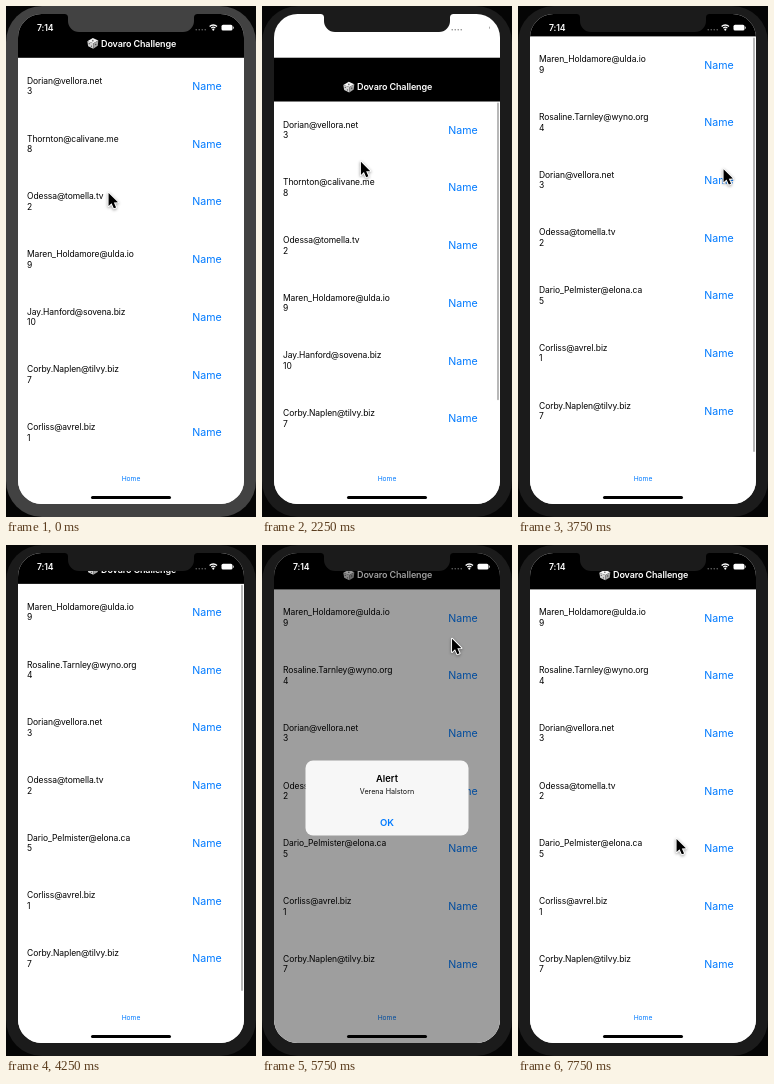
Write an HTML page with a canvas that moves like this. It is 250 px wide and 511 px high and loops after 8000 ms.

```html
<!DOCTYPE html>
<html lang="en">
<head>
<meta charset="utf-8">
<title>User list</title>
<style>
  html, body { margin: 0; width: 100%; height: 100%; overflow: hidden; background: #000; }
  canvas { display: block; width: 250px; height: 511px; }
</style>
</head>
<body>
<canvas id="stage"></canvas>
<script>
const W = 250, H = 511, LOOP = 8000, STEP = 250;
const BLUE = '#007aff', FONT = 'Inter, Roboto, sans-serif';
const SCREEN = { x: 12, y: 8, w: 226, h: 490, r: 23.5 };
const HEADER = 51.8, ROW_H = 57.7, LIST_END = 447, MAX_SCROLL = 7.4;

const canvas = document.getElementById('stage');
const ctx = canvas.getContext('2d');
const ratio = window.devicePixelRatio || 1;
canvas.width = W * ratio;
canvas.height = H * ratio;

const users = {
  1: 'Corliss@avrel.biz',
  2: 'Odessa@tomella.tv',
  3: 'Dorian@vellora.net',
  4: 'Rosaline.Tarnley@wyno.org',
  5: 'Dario_Pelmister@elona.ca',
  7: 'Corby.Naplen@tilvy.biz',
  8: 'Thornton@calivane.me',
  9: 'Maren_Holdamore@ulda.io',
  10: 'Jay.Hanford@sovena.biz'
};

// Visible ids before, between and after the two refreshes
const firstList = [3, 8, 2, 9, 10, 7, 1];
const secondList = [3, 9, 2, 4, 7, 10, 8];
const thirdList = [9, 4, 3, 2, 5, 1, 7];

// Pointer gestures, each continuing from the last position
const pointerStart = { x: 102, y: 186 };
const gestures = [
  { from: 350, to: 1500, x: 115, y: 68 },
  { from: 1500, to: 1750, x: 116, y: 77 },
  { from: 1750, to: 2950, x: 55, y: 346 },
  { from: 3000, to: 4000, x: 215, y: 150 },
  { from: 4250, to: 5250, x: 196, y: 74 },
  { from: 5450, to: 6500, x: 126, y: 276 },
  { from: 7250, to: 7750, x: 158, y: 293 }
];

const ramp = (t, from, to) => Math.min(1, Math.max(0, (t - from) / (to - from)));
const bump = (t, from, to) => Math.sin(Math.PI * ramp(t, from, to)) ** 2;
const ease = p => p < 0.5 ? 4 * p ** 3 : 1 - 4 * (1 - p) ** 3;

function pointerAt(t) {
  let { x, y } = pointerStart;
  for (const g of gestures) {
    const p = ease(ramp(t, g.from, g.to));
    x += (g.x - x) * p;
    y += (g.y - y) * p;
  }
  return [x, y];
}

// Pull to refresh, then a push past the end that springs back
function scrollAt(t) {
  return MAX_SCROLL * ease(ramp(t, 3000, 4000))
    - 50 * bump(t, 1750, 3050)
    + 16 * bump(t, 3250, 4500);
}

function listAt(t) {
  if (t < 2500) return firstList;
  return t < 3750 ? secondList : thirdList;
}

function text(str, x, y, size, color, weight = 400, align = 'left', spacing = 0) {
  ctx.font = `${weight} ${size}px ${FONT}`;
  ctx.letterSpacing = spacing + 'px';
  ctx.textAlign = align;
  ctx.fillStyle = color;
  ctx.fillText(str, x, y);
}

function rect(x, y, w, h, color) {
  ctx.fillStyle = color;
  ctx.fillRect(x, y, w, h);
}

function round(x, y, w, h, r, color) {
  ctx.beginPath();
  ctx.roundRect(x, y, w, h, r);
  ctx.fillStyle = color;
  ctx.fill();
}

function dot(x, y, r, color) {
  ctx.beginPath();
  ctx.arc(x, y, r, 0, Math.PI * 2);
  ctx.fillStyle = color;
  ctx.fill();
}

function fillPath(d, color) {
  ctx.fillStyle = color;
  ctx.fill(new Path2D(d));
}

function drawDie(x, y) {
  ctx.save();
  ctx.translate(x, y);
  ctx.scale(1.1, 1.05);
  fillPath('M0-5 5-2.6.6 0-5-2Z', '#f4f4f4');
  fillPath('M-5-2 .6 0 .4 5.2-4.2 2.8Z', '#d2d2d2');
  fillPath('M.6 0 5-2.6 4.5 2.4.4 5.2Z', '#a6a6a6');
  dot(0, -2.5, 0.8, '#777');
  dot(-3.2, 0.4, 0.6, '#555');
  dot(-1.2, 2.8, 0.6, '#555');
  dot(2.6, 1.1, 0.7, '#555');
  ctx.restore();
}

function drawHeader(scroll) {
  rect(SCREEN.x, SCREEN.y - scroll, SCREEN.w, HEADER - SCREEN.y, '#000');
  drawDie(86.8, 37.3 - scroll);
  text('Dovaro Challenge', 95, 40.7 - scroll, 9, '#fff', 600, 'left', -0.12);
}

function drawRows(list, scroll) {
  list.forEach((id, i) => {
    const y = i * ROW_H - scroll;
    text(users[id], 21, y + 77.8, 8.5, '#000', 400, 'left', -0.08);
    text(id, 21, y + 88.4, 8.5, '#000');
    text('Name', 201, y + 84, 10.6, BLUE, 400, 'center');
  });
}

function drawScrollBar(scroll, alpha) {
  const top = HEADER + 1 - scroll;
  const bottom = Math.min(446, 438 + scroll);
  ctx.globalAlpha = alpha;
  round(235, top, 2, bottom - top, 1, '#b8b8b8');
  ctx.globalAlpha = 1;
}

function drawTabBar() {
  rect(SCREEN.x, LIST_END, SCREEN.w, 52, '#fff');
  text('Home', 125, 475, 6.7, BLUE, 400, 'center');
}

function drawStatus() {
  text('7:14', 31, 24.8, 8.7, '#fff', 600, 'left', -0.1);
  for (let i = 0; i < 4; i++) dot(190.2 + i * 3, 23.8, 0.7, '#777');
  ctx.strokeStyle = '#fff';
  ctx.lineWidth = 1.3;
  for (const r of [2.9, 5.2]) {
    ctx.beginPath();
    ctx.arc(207.3, 24.2, r, -Math.PI * 0.75, -Math.PI * 0.25);
    ctx.stroke();
  }
  dot(207.3, 23.6, 1.1, '#fff');
  round(215.5, 18.8, 11, 5.8, 1.6, '#fff');
  round(227, 20.6, 1, 2.2, 0.5, '#aaa');
}

function drawAlert(alpha) {
  ctx.globalAlpha = alpha;
  round(43.5, 215.5, 163, 75, 7.6, '#f7f7f7');
  text('Alert', 125, 236.8, 9.3, '#000', 600, 'center');
  text('Verena Halstorn', 125, 248.8, 7.2, '#111', 400, 'center');
  text('OK', 125, 281.2, 9.5, BLUE, 600, 'center');
  ctx.globalAlpha = 1;
}

function drawNotch(color) {
  const left = 62, right = W - left, bottom = 26, r = 11, flare = 3.5;
  ctx.beginPath();
  ctx.moveTo(left - flare, SCREEN.y - 1);
  ctx.lineTo(left - flare, SCREEN.y);
  ctx.arcTo(left, SCREEN.y, left, bottom, flare);
  ctx.arcTo(left, bottom, right, bottom, r);
  ctx.arcTo(right, bottom, right, SCREEN.y, r);
  ctx.arcTo(right, SCREEN.y, right + flare, SCREEN.y, flare);
  ctx.lineTo(right + flare, SCREEN.y - 1);
  ctx.fillStyle = color;
  ctx.fill();
}

function drawPointer(x, y) {
  const arrow = new Path2D('M.6 1V15L3.8 12 6.2 17.4 8.6 16.4 6.2 11.2 10.6 11Z');
  ctx.save();
  ctx.translate(x, y);
  ctx.scale(0.94, 0.94);
  ctx.shadowColor = 'rgba(0,0,0,0.4)';
  ctx.shadowBlur = 3 * ratio;
  ctx.shadowOffsetY = ratio;
  ctx.lineJoin = 'round';
  ctx.lineWidth = 2;
  ctx.strokeStyle = '#fff';
  ctx.stroke(arrow);
  ctx.shadowColor = 'transparent';
  ctx.fillStyle = '#000';
  ctx.fill(arrow);
  ctx.restore();
}

function draw(t) {
  const { x, y, w, h, r } = SCREEN;
  const scroll = scrollAt(t);
  const bar = ramp(t, 1750, 2000) - ramp(t, 4250, 4750);
  const alert = ramp(t, 5250, 5650) - ramp(t, 6750, 7250);
  const bezel = t < 1750 ? '#424242' : '#1b1b1b';

  ctx.setTransform(ratio, 0, 0, ratio, 0, 0);
  rect(0, 0, W, H, '#050505');
  round(0, 0, W, H, 36, bezel);

  ctx.save();
  ctx.beginPath();
  ctx.roundRect(x, y, w, h, r);
  ctx.clip();
  rect(x, y, w, h, '#fff');
  drawRows(listAt(t), scroll);
  drawHeader(scroll);
  drawScrollBar(scroll, bar);
  drawTabBar();
  rect(x, y, w, h, `rgba(0,0,0,${0.38 * alert})`);
  drawStatus();
  round(85, 490, 80, 3, 1.5, '#000');
  drawAlert(alert);
  ctx.restore();

  drawNotch(bezel);
  const hidden = t >= 4000 && t < 4500;
  if (!hidden) drawPointer(...pointerAt(t));
}

function tick(now) {
  draw(Math.floor((now % LOOP) / STEP) * STEP);
  requestAnimationFrame(tick);
}
requestAnimationFrame(tick);
</script>
</body>
</html>
```
